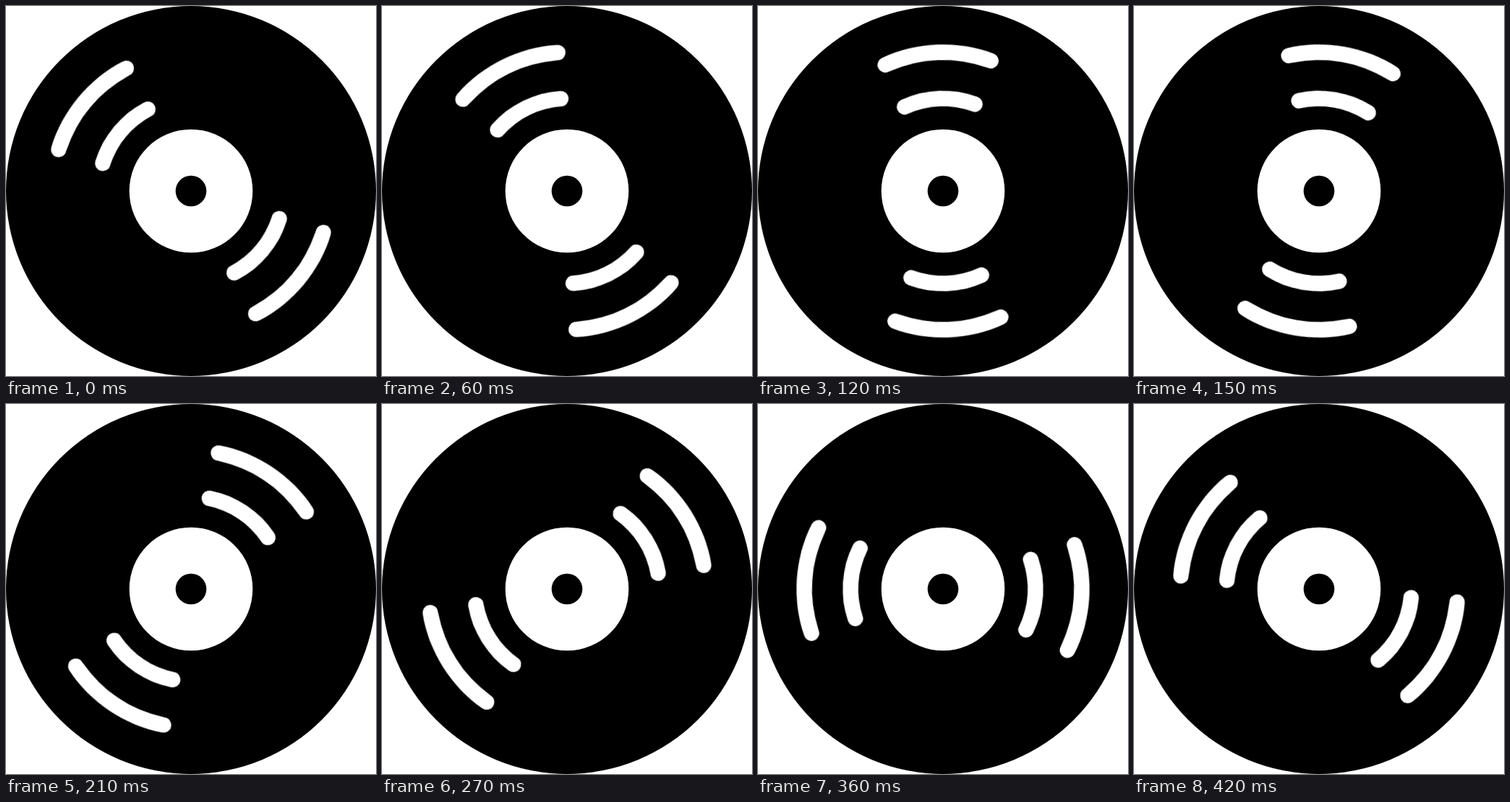
Animation, 512 px wide and 512 px high, one loop 0.45 s. Source, as an HTML page:

```html
<!DOCTYPE html>
<html lang="en">
<head>
<meta charset="utf-8">
<title>Spinning record</title>
<style>
  html, body { margin: 0; height: 100%; overflow: hidden; background: #fff; }
  svg { display: block; width: 100%; height: 100%; }
  .grooves {
    fill: none;
    stroke: #fff;
    stroke-width: 21.33;
    stroke-linecap: round;
    transform-origin: 0 0;
    animation: spin 450ms steps(15, end) infinite;
  }
  /* The grooves repeat every half turn */
  @keyframes spin {
    from { transform: rotate(-50.2deg); }
    to { transform: rotate(129.8deg); }
  }
</style>
</head>
<body>
<svg viewBox="0 0 512 512">
  <defs>
    <g id="pair">
      <path d="M-73.2-177.5A192 192 0 0 1 73.2-177.5"/>
      <path d="M-48.8-118.3A128 128 0 0 1 48.8-118.3"/>
    </g>
  </defs>
  <g transform="translate(256 256)">
    <circle r="256"/>
    <circle r="85.33" fill="#fff"/>
    <circle r="21.33"/>
    <g class="grooves">
      <use href="#pair"/>
      <use href="#pair" transform="rotate(180)"/>
    </g>
  </g>
</svg>
</body>
</html>
```
